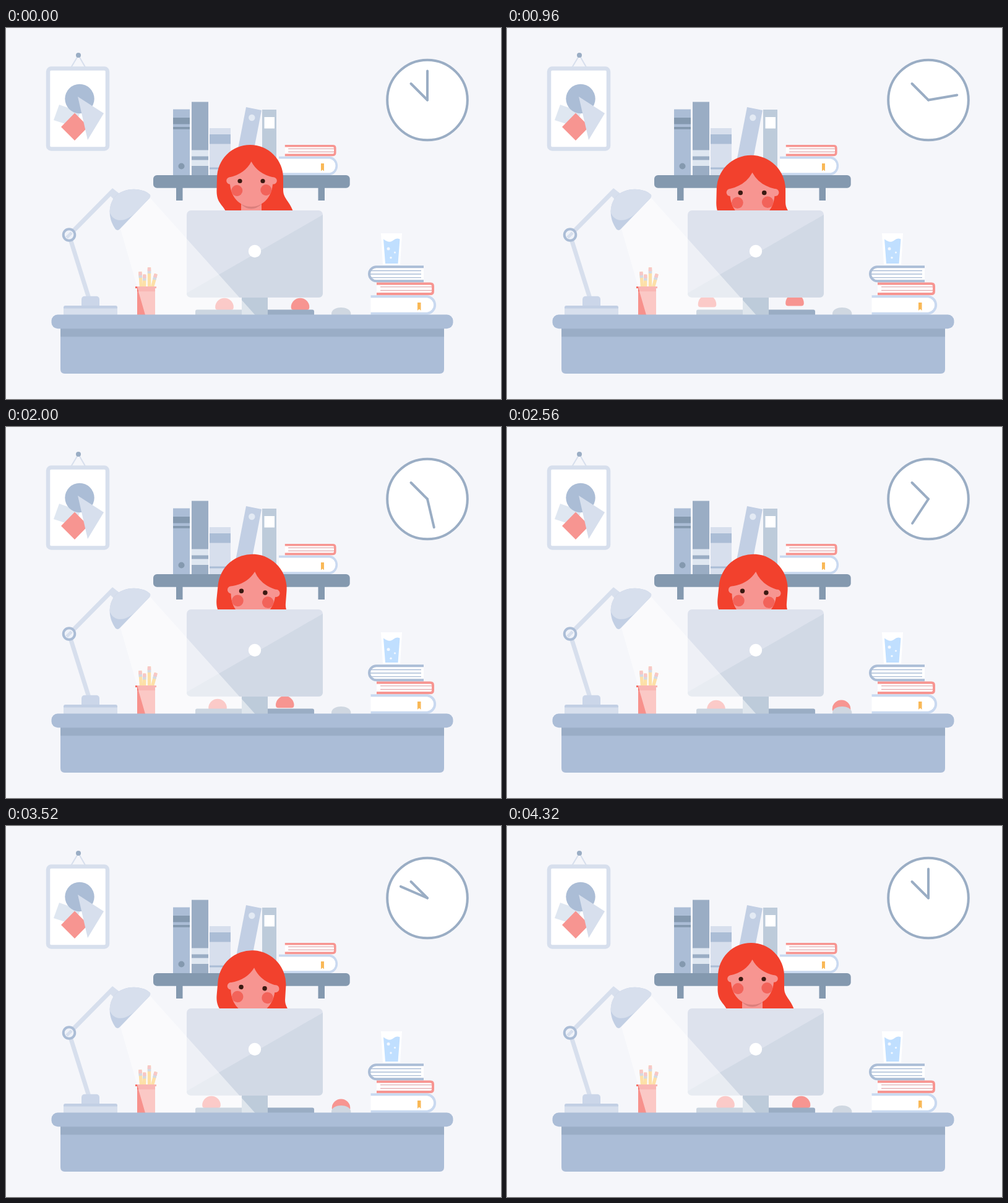
An HTML page for the animation above (4.36 s loop, 800x600 px).

```html
<!DOCTYPE html>
<html lang="en">
<head>
<meta charset="utf-8">
<title>Desk work</title>
<style>
html, body { margin: 0; width: 100%; height: 100%; overflow: hidden; background: #f5f6fa; }
svg { display: block; width: 800px; height: 600px; }
.skin { fill: #f79591; }
.pale { fill: #d7dfed; }
.blue { fill: #abbdd6; }
.mist { fill: #dfe7f1; }
.slate { fill: #8499af; }
.steel { fill: #9aadc4; }
.haze { fill: #c2cfe4; }
.line { fill: none; stroke-linecap: round; }

.minute, .head, .bubbles, .move, .tap { animation: 4360ms infinite cubic-bezier(.33, 0, .67, 1); }
.minute { transform-origin: 681px 116.5px; animation-name: minute; animation-timing-function: linear; }
.head { transform-origin: 396px 288px; animation-name: duck, tilt; }
.bubbles { animation-name: rise; animation-timing-function: linear; }
.left { animation-name: left-move; }
.left .tap { animation-name: left-tap; }
.right { animation-name: right-move; }
.right .tap { animation-name: right-tap; }

@keyframes minute {
  0% { rotate: 0deg; }
  99.08%, 100% { rotate: 360deg; }
}
@keyframes duck {
  0%, 11.01%, 88.07%, 100% { translate: 0 0; scale: 1; }
  22.02%, 77.06% { translate: 0 20.6px; scale: 1.04; }
}
@keyframes tilt {
  0%, 27.52%, 90.83%, 100% { rotate: 0deg; }
  39%, 77.06% { rotate: 4.3deg; }
}
@keyframes rise {
  0%, 22.02% { translate: 0 0; }
  36.7% { translate: 0 5.5px; }
  58.72% { translate: 0 -1px; }
  80.73%, 99.08% { translate: 0 -4.5px; }
  100% { translate: 0 0; }
}
@keyframes left-move {
  0%, 99.08%, 100% { translate: 353px 0; }
  11.01%, 16.5% { translate: 322px 0; }
  22.02% { translate: 323.5px 0; }
  33%, 38.5% { translate: 354px 0; }
  49.5%, 60.5% { translate: 338px 0; }
  71.6%, 82.6% { translate: 332px 0; }
}
@keyframes left-tap {
  0%, 11.01%, 13.76%, 80.73%, 88.07%, 99.08%, 100% { translate: 0 0; }
  5.5%, 30.3%, 41.3%, 52.3%, 63.3%, 74.3% { translate: 0 -4px; }
  22.02% { translate: 0 -4.5px; }
  26%, 36.7%, 46.8%, 69% { translate: 0 3.5px; }
  58.72% { translate: 0 5px; }
}
@keyframes right-move {
  0%, 16.5%, 99.08%, 100% { translate: 475.5px 0; }
  22.02% { translate: 465px 0; }
  31%, 44% { translate: 443px 0; }
  55%, 60.5% { translate: 540.5px 0; }
  66%, 82.6% { translate: 541.5px 0; }
}
@keyframes right-tap {
  0%, 13.76%, 36.7%, 44%, 93.6%, 99.08%, 100% { translate: 0 0; }
  22.02% { translate: 0 -6.5px; }
  27.5% { translate: 0 2px; }
  32.1%, 40.4% { translate: 0 -4px; }
  49.5%, 88.07% { translate: 0 -6px; }
  55%, 82.6% { translate: 0 4.7px; }
}
</style>
</head>
<body>
<svg viewBox="0 0 800 600">
  <defs>
    <g id="pink-book">
      <path d="M599 413.5H686q4 0 4 4V426q0 4-4 4H599" fill="#fff" stroke="#f79591" stroke-width="4"/>
      <path d="M605 418.7H688M605 424.4H688" stroke="#e0abb0" stroke-width="1.3"/>
    </g>
    <g id="white-book">
      <path d="M589.500 434.300H681a13.800 13.800 0 0 1 0 27.400H589.500" fill="#fff" stroke="#c9d9f0" stroke-width="4"/>
      <path d="M665 444h5.500v13l-2.750-2.500-2.750 2.500z" fill="#f9b856"/>
    </g>
    <path id="hand" class="skin" d="M-14.800 451.500A14.800 14.800 0 0 1 14.800 451.500Q14.800 456 10.500 456H-10.500Q-14.800 456-14.800 451.500Z"/>
    <g id="pencil">
      <rect x="-2.700" width="5.400" height="34" fill="#fbc14e"/>
      <rect x="-2.700" y="4" width="5.400" height="6" fill="#a9b4c6"/>
      <path d="M-2.700 6V2q0-2 2-2H.7q2 0 2 2V6z" fill="#f08f8f"/>
    </g>
  </defs>

  <!-- wall picture -->
  <path class="line" d="M105 64 117 44 128.500 64" stroke="#d7dfed" stroke-width="2"/>
  <circle class="steel" cx="117" cy="44" r="4"/>
  <rect x="68" y="65.500" width="96" height="130" rx="5" fill="#fff" stroke="#d7dfed" stroke-width="6.500"/>
  <path class="mist" d="M86 124 120 136 111 160 77 149z"/>
  <circle class="blue" cx="119" cy="114.500" r="23.700"/>
  <path class="skin" d="M111 137.500 133 159.500 111 182 89 160z"/>
  <path class="pale" d="M116 111 158 138 132 181z"/>

  <!-- clock -->
  <circle cx="681" cy="116.500" r="64.800" fill="#fff" stroke="#9aadc4" stroke-width="4"/>
  <g class="line" stroke="#9aadc4" stroke-width="4">
    <path d="M681 116.500 654.500 90"/>
    <path class="minute" d="M681 116.500V69.500"/>
  </g>

  <!-- shelf -->
  <rect class="blue" x="270" y="131.500" width="27" height="107"/>
  <path class="slate" d="M270 145h27v10.500h-27zM270 160h27v3.700h-27z"/>
  <circle class="slate" cx="283.500" cy="223.500" r="5"/>
  <rect class="steel" x="300" y="119.500" width="27" height="119"/>
  <path class="mist" d="M300 197.500h27v10h-27zM300 213.500h27v9.500h-27z"/>
  <rect class="pale" x="329" y="162" width="34" height="77"/>
  <path class="blue" d="M329 172h34v15.500h-34zM329 225.500h34v3h-34z"/>
  <path class="haze" d="M388 128 413 133 392.500 239H366.500z"/>
  <circle cx="397.300" cy="145" r="5.200" fill="#e3eaf4"/>
  <rect x="414" y="132" width="23" height="107" fill="#bdcbda"/>
  <rect x="417.500" y="144" width="16.500" height="18.500" fill="#fff"/>
  <use href="#white-book" transform="translate(-89.500 -211.700) scale(.9 .97)"/>
  <use href="#pink-book" transform="translate(-82.300 -177.300) scale(.89)"/>
  <rect class="slate" x="238" y="238" width="317.700" height="20.700" rx="6"/>
  <path class="slate" d="M275 258h10.500v21H275zM504.500 258H515v21h-10.500z"/>

  <!-- woman -->
  <g class="head">
    <path d="M341 242.500A53.500 53.500 0 0 1 448 242.500V262C448 276 458 279 464.500 298H356C350 285 340 283 340.500 262Z" fill="#f2412d"/>
    <rect class="skin" x="380" y="278" width="33" height="22"/>
    <path d="M380 285Q396 300 413 285Z" fill="#db7f7c"/>
    <circle class="skin" cx="362" cy="247" r="5.800"/>
    <circle class="skin" cx="432" cy="247" r="5.800"/>
    <path class="skin" d="M396.500 216Q386 236 361 241.500L362 253C364 276 380 289 396.500 289C413 289 429 276 431 253L432 241.500Q407 236 396.500 216Z"/>
    <circle cx="373.300" cy="263" r="9" fill="#f2635a"/>
    <circle cx="420.300" cy="262" r="9" fill="#f2635a"/>
    <circle cx="378" cy="247.500" r="3.600" fill="#3a1a12"/>
    <circle cx="415" cy="247.500" r="3.600" fill="#3a1a12"/>
  </g>
  <g class="move left"><use class="tap" href="#hand"/></g>
  <g class="move right"><use class="tap" href="#hand"/></g>

  <!-- computer -->
  <path class="steel" d="M306 464V458.500q0-3 3-3H495q3 0 3 3V464z"/>
  <rect x="381" y="430" width="42" height="34" fill="#bdcbda"/>
  <rect x="292" y="295" width="220" height="140.700" rx="7" fill="#dde2ed"/>
  <path d="M512 302V428.700q0 7-7 7H299q-7 0-7-7z" fill="#d1d9e5"/>
  <circle cx="402" cy="361" r="10.200" fill="#fff"/>
  <path d="M526 464V461C528 449 555 449 557.300 461V464z" fill="#cfd7e1"/>

  <!-- pencil cup -->
  <use href="#pencil" transform="translate(216.800 394) rotate(-4)"/>
  <use href="#pencil" transform="translate(223.700 398.500)"/>
  <use href="#pencil" transform="translate(231.500 387)"/>
  <use href="#pencil" transform="translate(242.300 397.500) rotate(15)"/>
  <rect x="212" y="420" width="29" height="44" fill="#f7918c"/>
  <path d="M209 418h34v3h-2v5h-29v-5h-3z" fill="#f46f68"/>

  <!-- lamp -->
  <g class="line" stroke="#d7dfed" stroke-width="7">
    <path d="M134 437 104.500 343M107 330 172 264"/>
  </g>
  <circle cx="102" cy="334.500" r="9.300" fill="#f0f3f9" stroke="#abbdd6" stroke-width="4"/>
  <path d="M106 331 98 339" stroke="#d7dfed" stroke-width="5"/>
  <rect x="122" y="433.700" width="29" height="20" rx="5" fill="#cbd6e9"/>
  <path class="haze" d="M93 464V452q0-3 3-3H177q3 0 3 3V464z"/>
  <rect class="pale" x="93" y="453.500" width="87" height="11"/>
  <path class="pale" d="M172 259 186 270 177 280 165 268z"/>
  <path class="haze" d="M233 270C222 258 190 256 175 274C164 290 166 310 177 325.500Q180.500 328.500 184 325L232 275Q234 272 233 270Z"/>
  <path class="pale" d="M233 270C222 258 190 256 175 274Q168 284 167.500 297C171 310 182 313 193 309.500Q202 306 210 298L232 275Q234 272 233 270Z"/>

  <path d="M233 275 402.500 464H225L185 325z" fill="#fff" opacity=".5"/>

  <!-- right stack -->
  <use href="#white-book"/>
  <use href="#pink-book"/>
  <path d="M675 386.300H598.500a11.500 11.500 0 0 0 0 23H675" fill="#fff" stroke="#abbdd6" stroke-width="4"/>
  <path d="M590 392.500H671M589 398H671M590 403.700H671" stroke="#abbdd6" stroke-width="1.300"/>
  <path d="M606 332H640L637 383H609z" fill="#fff"/>
  <path d="M610 341.500Q616 346.500 622 345.500C628 343 630 338.500 636.500 341.500L633.500 381H613z" fill="#c0dfff"/>
  <g class="bubbles" fill="#f2f8ff">
    <circle cx="618" cy="357" r="2.500"/>
    <circle cx="628.500" cy="363" r="1.600"/>
    <circle cx="622" cy="371.500" r="1.700"/>
  </g>

  <!-- desk -->
  <path d="M88 480H708V552q0 7-7 7H95q-7 0-7-7z" fill="#abbdd7"/>
  <rect x="88" y="484" width="620" height="15.300" fill="#9aadc6"/>
  <rect x="73.500" y="463.500" width="649" height="22.700" rx="10" fill="#abbdd7"/>
</svg>
</body>
</html>
```
